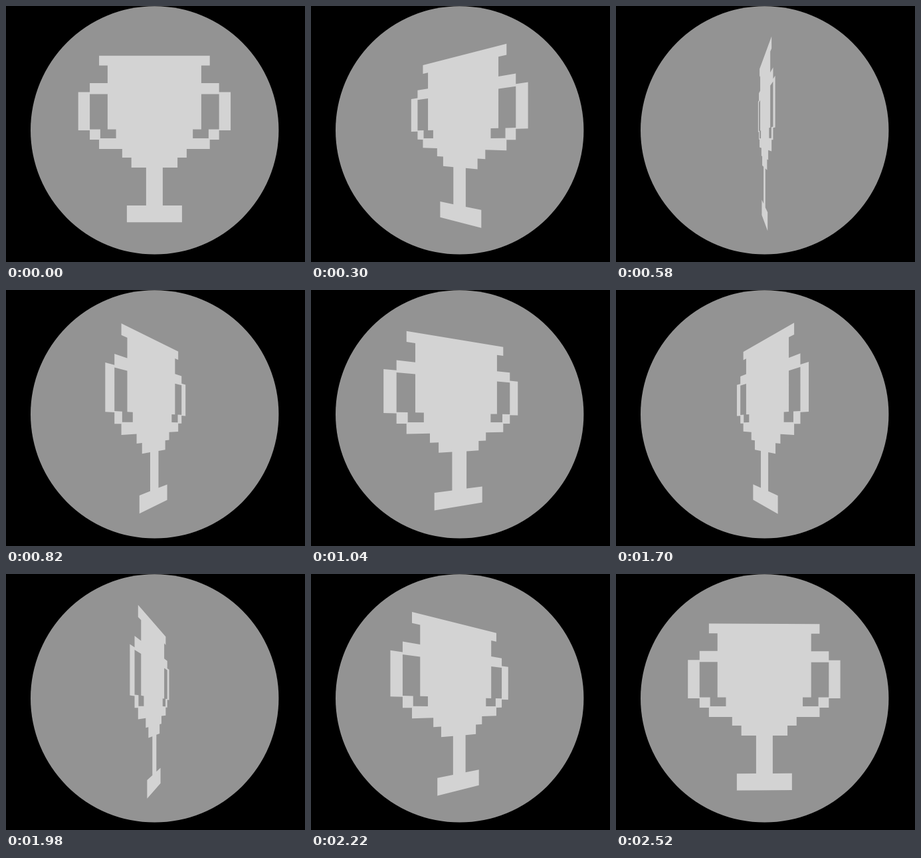
Animation, 450 px wide and 385 px high, one loop 2.56 s. Source, as an HTML page:

```html
<!DOCTYPE html>
<html lang="en">
<head>
<meta charset="utf-8">
<title>Spinning trophy</title>
<style>
  html, body { margin: 0; width: 100%; height: 100%; overflow: hidden; background: #000; }
  svg { display: block; width: 450px; height: 385px; }
</style>
</head>
<body>
<svg viewBox="0 0 450 385">
  <circle cx="223.7" cy="186.9" r="186.7" fill="#939393"/>
  <path id="cup" fill="#d3d3d3" fill-rule="evenodd"/>
</svg>
<script>
  const LOOP = 2560, DEPTH = 440, CX = 223.4, CY = 200;

  // Half-widths, measured from the axis
  const stem = 12.5, base = 41.5, body = 70.5, rim = 83.3, arm = 97.3, grip = 114.7;

  // Pixel staircase: each x runs from one y to the next
  const stairs = (xs, ys) => xs.flatMap((x, i) => [[x, ys[i]], [x, ys[i + 1]]]);
  const mirror = pts => pts.map(([x, y]) => [-x, y]).reverse();

  const side = stairs(
    [rim, body, arm, grip, arm, rim, 48.5, 34.7, stem, base],
    [74.8, 89.5, 116, 129.5, 187, 201, 215, 228, 243, 300, 325.2]
  );
  const hole = stairs([arm, 81.5, 57.8, body], [132.5, 185.5, 199, 185.5, 132.5]);
  const loops = [[...side, ...mirror(side)], hole, mirror(hole)];

  // 40 ms per step, with every 20th step held for 60 ms
  function stepAt(t) {
    const rest = t % 820;
    return 20 * Math.floor(t / 820) + Math.max(0, Math.floor((rest - 20) / 40));
  }

  // The second half turn is slightly slower
  function angleAt(step) {
    return Math.min(6 * step, 180 + 5.775 * (step - 30)) * Math.PI / 180;
  }

  function outline(angle) {
    const cos = Math.cos(angle), sin = Math.sin(angle);
    const project = ([x, y]) => {
      const scale = DEPTH / (DEPTH - x * sin);
      return (CX + x * cos * scale).toFixed(2) + ' ' + (CY + (y - CY) * scale).toFixed(2);
    };
    return loops.map(pts => 'M' + pts.map(project).join('L') + 'Z').join('');
  }

  const cup = document.getElementById('cup');
  const start = performance.now();

  function draw(now) {
    const t = Math.max(0, now - start) % LOOP;
    cup.setAttribute('d', outline(angleAt(stepAt(t))));
    requestAnimationFrame(draw);
  }
  draw(start);
</script>
</body>
</html>
```
